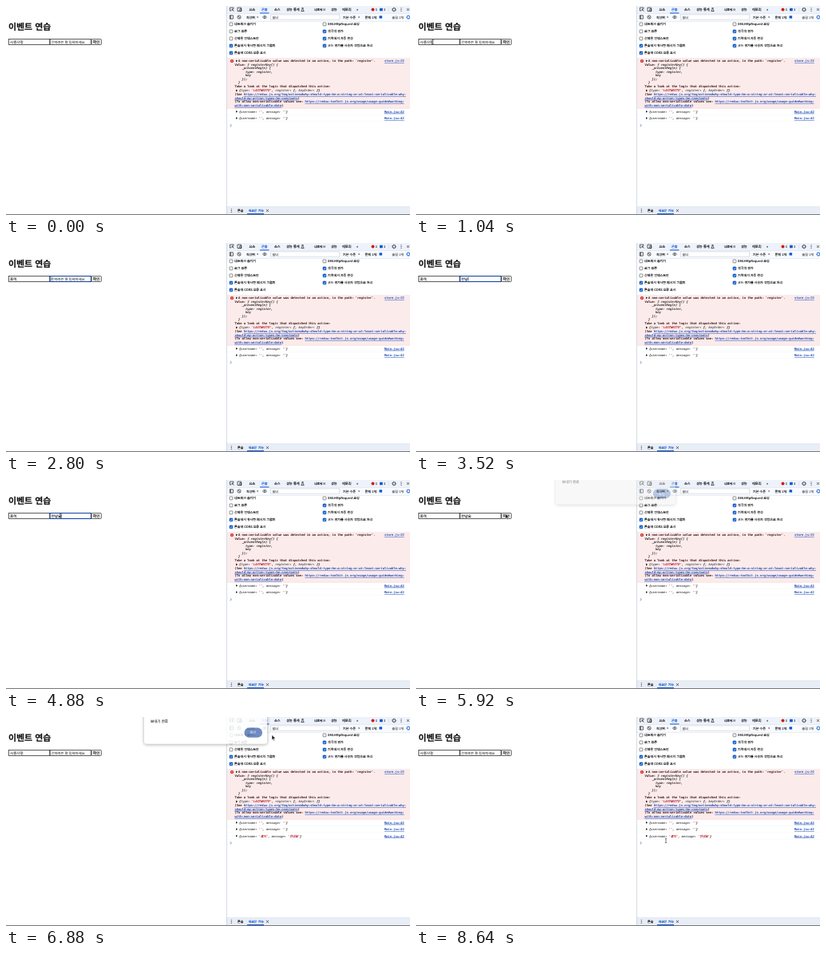
Write an HTML page that moves like this. It is 506 by 262 pixels and loops after 8720 ms.

```html
<!DOCTYPE html>
<html lang="ko">
<head>
<meta charset="utf-8">
<title>이벤트 연습</title>
<style>
  html, body { margin: 0; width: 100%; height: 100%; overflow: hidden; background: #fff; }
  svg { display: block; width: 100%; height: 100%; }
  text { font: 500 4px "Noto Sans CJK KR", "Noto Sans CJK", sans-serif; fill: #111; stroke: #111; stroke-width: .12; white-space: pre; text-rendering: geometricPrecision; }
  .mono { font-family: "DejaVu Sans Mono", "Noto Sans CJK KR", monospace; font-size: 3.75px; font-weight: 400; }
  .err { fill: #2d0505; stroke: #2d0505; }
  .obj { fill: #222; stroke: #222; font-style: italic; }
  .key { fill: #555; stroke: #555; }
  .str { fill: #b01020; stroke: #b01020; }
  .link { fill: #0b3fb0; stroke: #0b3fb0; text-decoration: underline; }
  .blue { fill: #0b4fc4; stroke: #0b4fc4; }
  .hint { fill: #555; stroke: #555; }
  .light { fill: #fff; stroke: none; }
  .icon { fill: none; stroke: #222; stroke-width: .7; }
</style>
</head>
<body>
<svg id="stage" viewBox="0 0 506 262"></svg>
<script>
const LOOP = 8720, STEP = 80;
const stage = document.getElementById('stage');

function add(tag, attrs = {}, parent = stage, html = '') {
  const el = document.createElementNS('http://www.w3.org/2000/svg', tag);
  for (const name in attrs) el.setAttribute(name, attrs[name]);
  el.innerHTML = html;
  parent.append(el);
  return el;
}
const rect = (x, y, width, height, fill, more = {}, parent) =>
  add('rect', { x, y, width, height, fill, ...more }, parent);
const path = (d, more = {}, parent) => add('path', { d, class: 'icon', ...more }, parent);
const circle = (cx, cy, r, more = {}) => add('circle', { cx, cy, r, ...more });
const label = (x, y, html, cls = '', size, parent) =>
  add('text', { x, y, class: cls, ...(size && { style: `font-size:${size}px` }) }, parent, html);
const span = (cls, s) => `<tspan class="${cls}">${s}</tspan>`;
const link = s => span('link', s);
const triangle = (x, y) => path(`M${x} ${y - 1.4}l2.2 1.4l-2.2 1.4z`, { fill: '#222', class: '' });
const dots = (x, y) => [-1.7, 0, 1.7].forEach(d => circle(x, y + d, .55, { fill: '#222' }));
const cross = (x, y) => path(`M${x - 1.4} ${y - 1.4}l2.8 2.8m0 -2.8l-2.8 2.8`);
const dropArrow = (x, y) => path(`M${x} ${y}h2.2l-1.1 1.5z`, { fill: '#222', class: '' });

function gear(x, y, color) {
  circle(x, y, 1.8, { class: 'icon', style: `stroke:${color}` });
  circle(x, y, 2.3, { fill: 'none', stroke: color, 'stroke-width': .8, 'stroke-dasharray': '.9 .9' });
}

// Page
label(3, 30, '이벤트 연습', '', 10.95).style.fontWeight = 700;
function field(x, hint) {
  return {
    x,
    box: rect(x, 41.5, 51.3, 7, '#fff', { stroke: '#333', 'stroke-width': .8 }),
    text: label(x + 1.5, 46.5, '', '', 4.5),
    caret: rect(0, 42.6, .5, 4.8, '#111'),
    hint
  };
}
const nameField = field(3.5, '사용자명');
const messageField = field(55.2, '전하려는 말 입력하세요');
rect(107, 41.5, 12.4, 7, '#efefef', { stroke: '#333', 'stroke-width': .7, rx: .8 });
label(109, 46.5, '확인', '', 4.6);

// Developer panel
rect(276.5, 0, 229.5, 262, '#fff');
rect(276.5, 0, 229.5, 9.3, '#edf2fb');
rect(276.5, 9.3, 229.5, 9.7, '#f8fafe');
for (const y of [9.3, 19, 65]) rect(276.5, y, 229.5, .5, '#d0dcf0');

path('M282 6h-1.5v-4h4.5v1.5M283 4l2.6 2.6M283 4v2M283 4h2');
path('M290 2h4.5v4.5h-4.5zM292.7 3.7h2.2v2.8h-2.2z');
const tabs = [[304.5, '요소'], [320, '콘솔', 'blue'], [336, '소스'], [351, '성능 통계'],
  [386, '네트워크'], [407, '성능'], [421, '메모리'], [439, '»']];
tabs.forEach(([x, s, cls]) => label(x, 6, s, cls, x === 386 ? 3.8 : 4.2));
path('M370.5 2.5h2M371 2.5v1.5l-1.2 2.5h3.4l-1.2 -2.5v-1.5');
rect(318, 8.4, 11.5, 1, '#0b57d0');
circle(459.5, 4.5, 2, { fill: '#d01c10' });
label(462.7, 6, '1');
rect(468, 2.7, 3.8, 3.5, '#0b57d0', { rx: .6 });
label(473, 6, '1');
rect(479, 2, .4, 5, '#c4d0e4');
gear(486, 4.5, '#222');
dots(495, 4.5);
cross(503.5, 4.5);

path('M280.2 11.8h4.2v4.3h-4.2zM281.5 11.8v4.3');
circle(292, 14, 2.1, { class: 'icon' });
path('M290.6 12.6l2.8 2.8');
label(301, 15.5, '최상위');
dropArrow(314, 13.4);
path('M321.5 14q2.5 -3.2 5 0q-2.5 3.2 -5 0z');
circle(324, 14, .8, { fill: '#222' });
rect(331.3, 10.9, 86.5, 6.2, '#fff', { stroke: '#c8ccd4', 'stroke-width': .6 });
label(333.5, 15.5, '필터', 'hint');
label(422, 15.5, '기본 수준');
dropArrow(441, 13.4);
label(449.5, 15.5, '문제 1개:');
rect(467.5, 12.2, 3.6, 3.4, '#0b57d0', { rx: .6 });
label(483.5, 15.5, '숨김 1개', 'hint');
gear(504, 14, '#0b57d0');

function check(x, row, on, s) {
  const y = 20.9 + row * 9;
  rect(x, y, 3.9, 3.9, on ? '#0b57c4' : '#fff', { rx: .7, stroke: on ? '#0b57c4' : '#444', 'stroke-width': .6 });
  if (on) path(`M${x + .8} ${y + 2}l.9 .9l1.5 -1.8`, { style: 'stroke:#fff' });
  label(x + 6.1, y + 3.5, s);
}
['네트워크 숨기기', '로그 보존', '선택된 컨텍스트만', '콘솔에서 유사한 메시지 그룹화', '콘솔에 CORS 오류 표시']
  .forEach((s, i) => check(280, i, i > 2, s));
['XMLHttpRequest 로깅', '적극적 평가', '기록에서 자동 완성', '코드 평가를 사용자 작업으로 처리']
  .forEach((s, i) => check(397, i, i > 0, s));

// Console messages
rect(277, 65.3, 229, 62.7, '#fcebeb');
rect(277, 127.9, 229, .5, '#f3cccc');
circle(283, 69, 2.1, { fill: '#d01c10' });
path('M282.2 68.2l1.6 1.6m0 -1.6l-1.6 1.6', { style: 'stroke:#fff;stroke-width:.5' });
triangle(288, 68.8);
label(291, 70.2, 'A non-serializable value was detected in an action, in the path: `register`.', 'mono err');
label(474, 70.2, link('store.js:22'), 'mono');
[
  'Value: ' + span('obj', 'ƒ registerKey() {'),
  span('obj', '    _preventReg(e) {'),
  span('obj', '      type: register,'),
  span('obj', '      key'),
  span('obj', '    });'),
  span('obj', '  }'),
  'Take a look at the logic that dispatched this action:'
].forEach((s, i) => label(286.5, 74.7 + i * 4.52, s, 'mono err'));
triangle(288, 106);
label(292, 107.3, `{${span('key', 'type')}: ${span('str', "'LASTWRITE'")}, ${span('key', 'register')}: ƒ, ${span('key', 'keyOrder')}: ƒ}`, 'mono obj');
[
  '(See ' + link('https://redux.js.org/faq/actions#why-should-type-be-a-string-or-at-least-serializable-why-'),
  link('should-my-action-types-be-constants') + ')',
  '(To allow non-serializable values see: ' + link('https://redux-toolkit.js.org/usage/usage-guide#working-'),
  link('with-non-serializable-data') + ')'
].forEach((s, i) => label(286.5, 112.2 + i * 4.57, s, 'mono err'));

function logRow(y, name, message) {
  const group = add('g');
  const parts = [triangle(288, y),
    label(292, y + 1.4, `{${span('key', 'username')}: ${span('str', `'${name}'`)}, ${span('key', 'message')}: ${span('str', `'${message}'`)}}`, 'mono obj'),
    label(474, y + 1.4, link('Main.jsx:42'), 'mono'),
    rect(277, y + 4, 229, .4, '#eef1f6')];
  group.append(...parts);
  return group;
}
logRow(132.3, '', '');
logRow(140.7, '', '');
const newRow = logRow(149.1, '호이', '안녕요');
const prompt = path('M280.8 148.2l1.6 1.5l-1.6 1.5', { style: 'stroke:#3a62b0' });

// Drawer and frame edges
rect(276.5, 251.6, 229.5, 10, '#e8edf6');
rect(276.5, 251.4, 229.5, .5, '#d0dcf0');
dots(282.3, 256.5);
label(290, 258, '콘솔');
label(303.5, 258, '새로운 기능', 'blue');
cross(327.5, 256.5);
rect(302, 260, 21, 1, '#0b57d0');
rect(276.2, 0, .7, 262, '#c3cbd8');
rect(0, 261, 506, 1, '#75787d');

// Alert
const dialog = add('g');
rect(173, -40, 154, 73.5, '#fff', { rx: 3, style: 'filter:drop-shadow(0 1px 2px rgba(0,0,0,.4))' }, dialog);
const sheet = rect(173, -40, 154, 73.5, '#fff', { rx: 3 }, dialog);
label(181, 6.5, '보내기 완료', '', 4.5, dialog);
rect(298.5, 13.5, 22.5, 12.3, '#5879b8', { rx: 6 }, dialog);
label(305.5, 21.2, '확인', 'light', 4.4, dialog);

const arrow = path('M0 0v6.2l1.5 -1.3l1 2.3l1 -.5l-1 -2.2h2z',
  { class: '', fill: '#111', stroke: '#fff', 'stroke-width': .5 });
const beam = path('M-1.2 -2.8q1.2 0 1.2 .8v4q0 .8 -1.2 .8M1.2 -2.8q-1.2 0 -1.2 .8M0 2q0 .8 1.2 .8',
  { style: 'stroke:#222;stroke-width:.6' });

// Timeline: each row is [ms, values...]
const pointerKeys = [[480, 60, 186], [960, 21, 45], [4720, 62, 45], [5440, 112, 42.3],
  [6160, 112, 42.3], [6640, 312, 19], [6800, 318, 20], [6880, 333, 22.5],
  [7360, 333, 23], [7760, 322, 110], [8160, 313, 155]];
const dialogKeys = [[5760, 0, .95, -4, 232], [5920, .4, .97, -2, 238], [6080, 1, 1, 0, 255],
  [6800, 1, 1, 0, 255], [6880, .85, 1, 0, 255], [6960, .3, 1, 0, 255], [7040, 0, 1, 0, 255]];
const typed = {
  name: [[0, ''], [1360, 'ㅎ'], [1520, '호'], [1680, '호ㅇ'], [1840, '호이'], [6880, '']],
  message: [[0, ''], [2960, 'ㅇ'], [3040, '아'], [3120, '안'], [3280, '안ㄴ'], [3440, '안녀'],
    [3520, '안녕'], [3680, '안녕ㅇ'], [3840, '안녕요'], [6880, '']]
};

const latest = (keys, t) => keys.filter(k => k[0] <= t).pop()[1];
function tween(keys, t) {
  const next = keys.findIndex(k => k[0] > t);
  if (next < 0) return keys.at(-1).slice(1);
  if (!next) return keys[0].slice(1);
  const a = keys[next - 1], b = keys[next];
  const p = (t - a[0]) / (b[0] - a[0]), eased = p * p * (3 - 2 * p);
  return a.slice(1).map((v, i) => v + (b[i + 1] - v) * eased);
}
const show = (el, on) => el.style.display = on ? '' : 'none';

function updateField(f, value, focused) {
  f.text.textContent = value || f.hint;
  f.text.setAttribute('class', value ? '' : 'hint');
  f.text.style.fontSize = value || f === nameField ? '4.5px' : '4.3px';
  f.box.setAttribute('stroke', focused ? '#0f3f9c' : '#333');
  f.box.setAttribute('stroke-width', focused ? 1 : .8);
  show(f.caret, focused);
  if (focused) f.caret.setAttribute('x', f.x + 1.6 + (value ? f.text.getComputedTextLength() : 0));
}

function draw(t) {
  updateField(nameField, latest(typed.name, t), t >= 1120 && t < 2720);
  updateField(messageField, latest(typed.message, t), t >= 2720 && t < 5600);

  const sent = t >= 6880;
  show(newRow, sent);
  prompt.setAttribute('transform', `translate(0 ${sent ? 8.2 : 0})`);

  const [opacity, scale, lift, gray] = tween(dialogKeys, t);
  show(dialog, opacity > 0);
  dialog.setAttribute('opacity', opacity);
  dialog.setAttribute('transform', `translate(250 ${lift}) scale(${scale}) translate(-250 0)`);
  sheet.setAttribute('fill', `rgb(${gray},${gray},${gray})`);

  const [x, y] = tween(pointerKeys, t);
  const visible = t >= 480 && t < 1360 || t >= 4720;
  const overText = y > 41 && y < 49 && x < 107 || x > 277 && y > 66;
  show(arrow, visible && !overText);
  show(beam, visible && overText);
  for (const el of [arrow, beam]) el.setAttribute('transform', `translate(${x} ${y})`);
}

function tick() {
  draw(Math.floor(performance.now() % LOOP / STEP) * STEP);
  requestAnimationFrame(tick);
}
tick();
</script>
</body>
</html>
```
